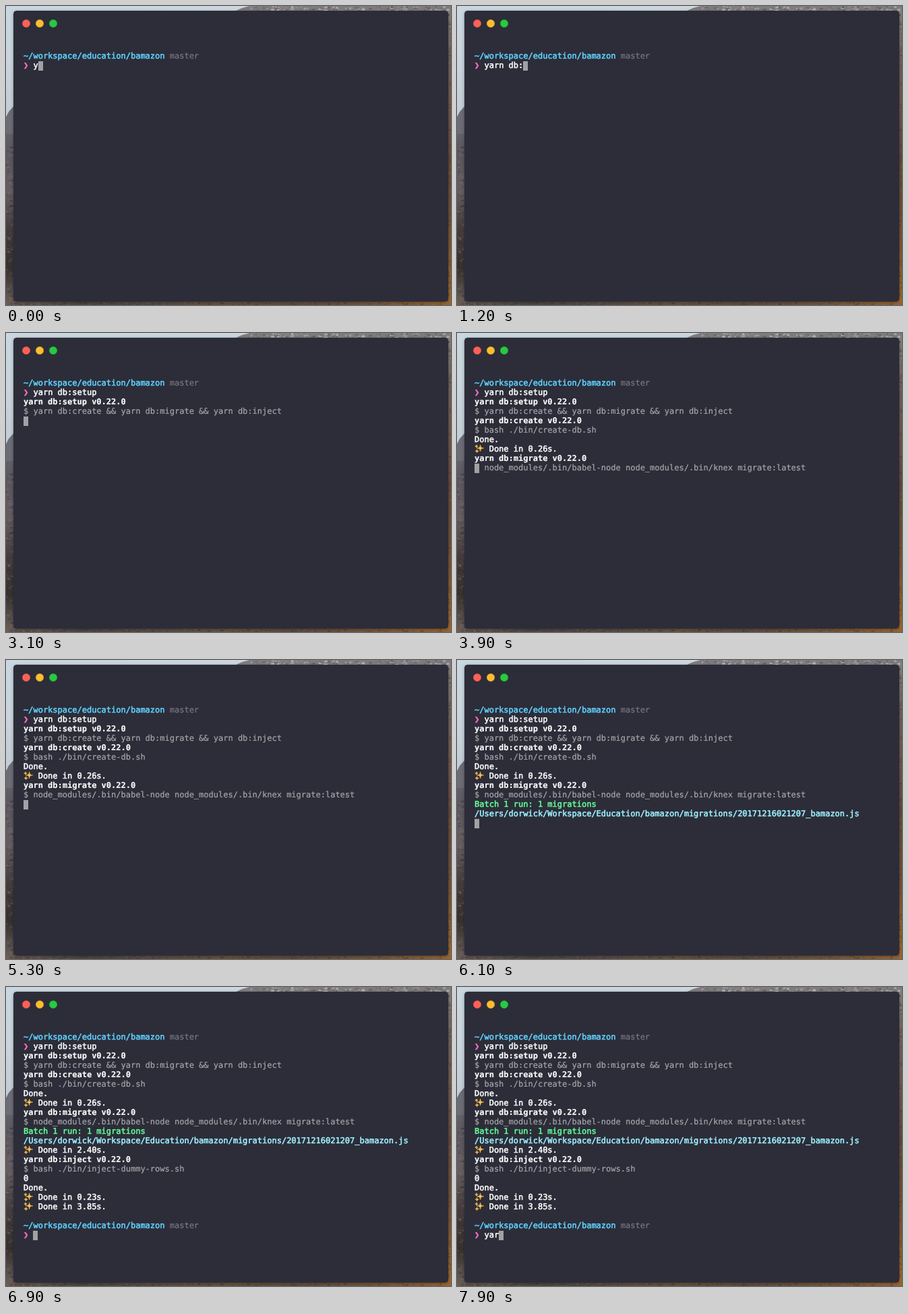
Write an HTML page with a canvas that moves like this. It is 660 px wide and 444 px high and loops after 8000 ms.

```html
<!DOCTYPE html>
<html lang="en">
<head>
<meta charset="utf-8">
<title>Terminal session</title>
<style>
  html, body { margin: 0; width: 100%; height: 100%; overflow: hidden; background: #2c2d39; }
  canvas { position: absolute; left: 0; top: 0; }
  #term {
    position: absolute; left: 26px; top: 67px;
    font: 12px/14px "DejaVu Sans Mono", "Liberation Mono", monospace;
    text-rendering: geometricPrecision; white-space: pre; color: #fbfbfa;
  }
  .row { height: 14px; -webkit-text-stroke: .55px currentColor; }
  .row b { -webkit-text-stroke: .2px currentColor; }
  .dim, .branch { -webkit-text-stroke: .2px currentColor; }
  .dim { color: #a6a7a9; }
  .branch { color: #777880; }
  .path { color: #5fd2ff; }
  .mark { color: #ff6ac1; }
  .ok { color: #62fb95; }
  .file { color: #9ff0ff; }
  .spark { display: inline-block; width: 2ch; height: 14px; vertical-align: top; }
  #cursor { position: absolute; left: 0; top: 0; width: 7px; height: 14px; background: #a1a1a5; }
</style>
</head>
<body>
<canvas id="scene" width="660" height="444"></canvas>
<div id="term"><div id="cursor"></div></div>
<script>
const LOOP = 8000, ROW = 14, COL = 7.224;
const ctx = document.getElementById('scene').getContext('2d');
const term = document.getElementById('term');
const cursor = document.getElementById('cursor');

// ---- Backdrop ----
let seed = 11;
const rnd = () => (seed = (seed * 16807) % 2147483647) / 2147483647;

function fade(x, y, w, h, across, stops) {
  const g = across ? ctx.createLinearGradient(x, 0, x + w, 0) : ctx.createLinearGradient(0, y, 0, y + h);
  stops.forEach((c, i) => g.addColorStop(i / (stops.length - 1), c));
  ctx.fillStyle = g;
  ctx.fillRect(x, y, w, h);
}

function poly(color, ...p) {
  ctx.fillStyle = color;
  ctx.beginPath();
  for (let i = 0; i < p.length; i += 2) ctx.lineTo(p[i], p[i + 1]);
  ctx.fill();
}

function speckle(x, y, w, h, count, colors) {
  for (let i = 0; i < count; i++) {
    ctx.fillStyle = colors[Math.floor(rnd() * colors.length)];
    ctx.fillRect(x + rnd() * w, y + rnd() * h, 1 + rnd() * 4, 1 + rnd() * 2);
  }
}

function backdrop() {
  fade(0, 0, 660, 8, true, ['#cad7e0', '#ccd7de', '#d2dade']);
  fade(0, 0, 12, 170, false, ['#cad7e0', '#c9d4dc', '#c2cbd3']);
  poly('#7f7c80', 339, 8, 350, 3, 361, 0, 660, 0, 660, 8);
  speckle(360, 0, 296, 7, 150, ['#d0d2d6aa', '#5c565899', '#8d8584', '#b3b2b6aa', '#665c58aa']);
  fade(0, 164, 12, 280, false, ['#686872', '#5a565f', '#655c60', '#443c3c', '#35302f', '#6b605b']);
  poly('#6b6c76', 0, 165, 4, 157, 12, 148, 12, 190, 0, 190);
  speckle(0, 205, 11, 235, 130, ['#7b716f55', '#2a252566', '#8a7d7644', '#40393855']);
  fade(655, 7, 5, 437, false, ['#85807f', '#6d625d', '#70574a', '#634a38', '#6e4f36', '#83592f', '#a0682c']);
  speckle(655, 8, 5, 430, 110, ['#3c2c2355', '#a5733f44', '#57402f66']);
  fade(0, 438, 660, 6, true, ['#655953', '#4b4542', '#574b45', '#65533f', '#5c4b3e', '#74563a', '#98632f']);
  speckle(0, 439, 656, 5, 190, ['#2d272555', '#8a6d5044', '#4a3c3566']);
}

function disc(x, color, rim) {
  ctx.fillStyle = color;
  ctx.strokeStyle = rim;
  ctx.beginPath();
  ctx.arc(x, 26, 5.75, 0, Math.PI * 2);
  ctx.fill();
  ctx.lineWidth = .5;
  ctx.stroke();
}

function frame() {
  ctx.shadowColor = 'rgba(0,0,0,.35)';
  ctx.shadowBlur = 4;
  ctx.shadowOffsetY = 1;
  ctx.fillStyle = '#2c2d39';
  ctx.beginPath();
  ctx.roundRect(11, 7, 645, 432, 5);
  ctx.fill();
  ctx.shadowColor = 'transparent';
  disc(30, '#fc6158', '#e2483f');
  disc(50, '#fdbd2f', '#e0a023');
  disc(70, '#29c941', '#1dad2c');
}

// ---- Terminal rows ----
const star = (x, y, r) =>
  `<path d="M${x} ${y - r}Q${x} ${y} ${x + r} ${y}Q${x} ${y} ${x} ${y + r}Q${x} ${y} ${x - r} ${y}Q${x} ${y} ${x} ${y - r}"/>`;
const sparkle = `<svg class="spark" viewBox="0 0 14.45 14" fill="#fbc04d" stroke="#fbc04d" stroke-width=".7">${
  star(8.6, 6, 5) + star(3, 3.2, 2.3) + star(3.6, 10.4, 2.6)}</svg>`;

const span = (cls, text) => `<span class="${cls}">${text}</span>`;
const head = task => `<b>yarn db:${task} v0.22.0</b>`;
const cmd = text => span('dim', '$ ' + text);
const done = sec => `${sparkle} Done in ${sec}s.`;
const place = span('path', '~/workspace/education/bamazon') + ' ' + span('branch', 'master');
const prompt = span('mark', '❯') + ' <span class="typed"></span>';

const rows = [
  [0, place],
  [0, prompt],
  [2800, head('setup')],
  [2900, cmd('yarn db:create &amp;&amp; yarn db:migrate &amp;&amp; yarn db:inject')],
  [3300, head('create')],
  [3400, cmd('bash ./bin/create-db.sh')],
  [3600, 'Done.'],
  [3700, done('0.26')],
  [3800, head('migrate')],
  [3900, cmd('node_modules/.bin/babel-node node_modules/.bin/knex migrate:latest')],
  [6000, span('ok', 'Batch 1 run: 1 migrations')],
  [6000, span('file', '/Users/dorwick/Workspace/Education/bamazon/migrations/20171216021207_bamazon.js')],
  [6200, done('2.40')],
  [6500, head('inject')],
  [6600, cmd('bash ./bin/inject-dummy-rows.sh')],
  [6700, '0'],
  [6700, 'Done.'],
  [6700, done('0.23')],
  [6800, done('3.85')],
  [6900, ''],
  [6900, place],
  [6900, prompt],
].map(([at, html]) => {
  const el = document.createElement('div');
  el.className = 'row';
  el.innerHTML = html;
  term.insertBefore(el, cursor);
  return { at, el };
});

const entries = [
  { row: 1, text: 'yarn db:setup', keys: [0, 200, 400, 500, 700, 900, 1000, 1200, 1300, 1400, 1600, 1700, 1900], enter: 2100 },
  { row: 21, text: 'yar', keys: [7500, 7700, 7900], enter: LOOP },
];
const fields = term.querySelectorAll('.typed');

function render(t) {
  let row = 0, col = 0;
  for (const { at, el } of rows) {
    const shown = t >= at;
    el.style.visibility = shown ? 'visible' : 'hidden';
    if (shown) row++;
  }
  entries.forEach((e, i) => {
    const n = e.keys.filter(k => t >= k).length;
    fields[i].textContent = e.text.slice(0, n);
    if (t >= rows[e.row].at && t < e.enter) {
      row = e.row;
      col = 2 + n;
    }
  });
  // The caret briefly sits on the migrate command before dropping a line.
  if (t >= 3900 && t < 4000) row = 9;
  cursor.style.transform = `translate(${Math.round(col * COL)}px, ${row * ROW + 1}px)`;
}

function tick() {
  render(performance.now() % LOOP);
  requestAnimationFrame(tick);
}

backdrop();
frame();
render(0);
tick();
</script>
</body>
</html>
```
